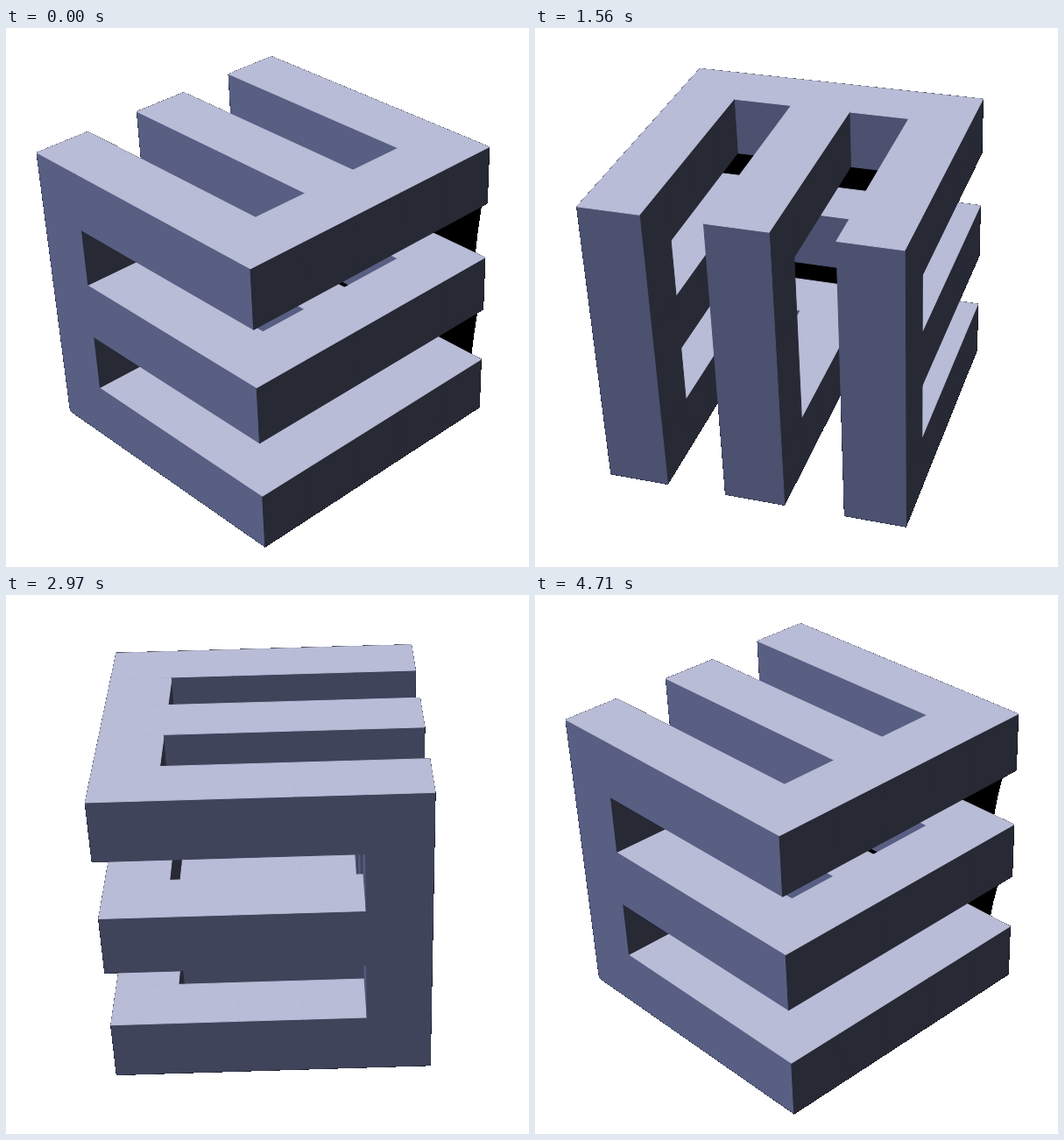
These frames come from a looping animation (597x615 px, 4740 ms). An HTML page with a canvas:

```html
<!DOCTYPE html>
<html lang="en">
<head>
<meta charset="utf-8">
<title>Turning letter cube</title>
<style>
html, body { margin: 0; width: 100%; height: 100%; overflow: hidden; background: #fff; }
canvas { display: block; }
</style>
</head>
<body>
<canvas id="stage" width="597" height="615"></canvas>
<script>
const W = 597, H = 615, STEP = 30, STEPS = 158;
const ctx = document.getElementById('stage').getContext('2d', { willReadFrequently: true });
const RAD = Math.PI / 180, START = 46.15, LIGHT = 212 * RAD;
const EYE = { x: 0.773, y: -8.86, z: 4.57 };
const TOP = 'rgb(184,188,214)';
let cos = 1, sin = 0;

// The cube spans -1..1 in x and y, and -2..0 in z, split into 5 x 5 x 5 cells.
const X = i => -1 + 0.4 * i;
const Z = k => -2 + 0.4 * k;
const inside = n => n >= 0 && n < 5;
const even = n => n % 2 === 0;
const hollow = (i, j, k) => i === 2 && k === 2 && j > 0 && j < 4;
const solid = (i, j, k) => inside(i) && inside(j) && inside(k) &&
  (j === 0 || even(i)) && (j === 4 || even(k)) && !hollow(i, j, k);

function project(x, y, z) {
  const rx = x * cos - y * sin, ry = x * sin + y * cos;
  const w = 1 - 0.004 * rx + 0.0853 * ry - 0.0535 * z;
  return [434 + (183 * rx - 141.5) / w, 290 - (151 + 97.3 * ry + 155.7 * z) / w];
}

function shade(azimuth) {
  const c = Math.max(0, Math.cos(azimuth - LIGHT));
  return `rgb(${39 + 50.7 * c | 0},${41 + 56 * c | 0},${52 + 82 * c | 0})`;
}

function quad(color, corners) {
  ctx.fillStyle = ctx.strokeStyle = color;
  ctx.beginPath();
  for (const c of corners) ctx.lineTo(...project(...c));
  ctx.closePath();
  ctx.fill();
  ctx.stroke();
}

// Cell indices from the farthest to the nearest along one axis
const farFirst = (eye, pos) => [0, 1, 2, 3, 4].sort((a, b) =>
  Math.abs(pos(b + 0.5) - eye) - Math.abs(pos(a + 0.5) - eye));

function drawCube(angle) {
  const ex = EYE.x * cos + EYE.y * sin, ey = EYE.y * cos - EYE.x * sin;
  const xs = farFirst(ex, X), ys = farFirst(ey, X), zs = farFirst(EYE.z, Z);
  const sideX = [shade(angle + Math.PI), shade(angle)];
  const sideY = [shade(angle - Math.PI / 2), shade(angle + Math.PI / 2)];
  ctx.lineWidth = 1;
  ctx.lineJoin = 'round';
  for (const k of zs) for (const j of ys) for (const i of xs) {
    if (!solid(i, j, k)) continue;
    const x0 = X(i), x1 = X(i + 1), y0 = X(j), y1 = X(j + 1), z0 = Z(k), z1 = Z(k + 1);
    for (const s of [0, 1]) {
      const d = 2 * s - 1, x = s ? x1 : x0, y = s ? y1 : y0;
      if ((ex - x) * d > 0 && !solid(i + d, j, k))
        quad(sideX[s], [[x, y0, z0], [x, y1, z0], [x, y1, z1], [x, y0, z1]]);
      if ((ey - y) * d > 0 && !solid(i, j + d, k))
        quad(sideY[s], [[x0, y, z0], [x1, y, z0], [x1, y, z1], [x0, y, z1]]);
    }
    if (!solid(i, j, k + 1))
      quad(TOP, [[x0, y0, z1], [x1, y0, z1], [x1, y1, z1], [x0, y1, z1]]);
  }
}

// Dark limit inside the notches that open to the right
function drawNotches(t) {
  const side = project(1, -1, 0)[0] > project(-1, -1, 0)[0] ? 1 : -1;
  if (project(side, -1, 0)[0] < project(side, 1, 0)[0]) return;
  const d = t < 2000 ? 7 + 13 * t / 1080 : 14;
  ctx.strokeStyle = '#000';
  ctx.lineWidth = 2;
  for (const k of [1, 3]) {
    const [ax, ay] = project(side, -1, Z(k + 1)), [bx, by] = project(side, -1, Z(k));
    ctx.beginPath();
    ctx.moveTo(ax - d, ay);
    ctx.quadraticCurveTo(ax - 1.7 * d, (ay + by) / 2, bx - 1.8 * d, by);
    ctx.stroke();
  }
}

// White reaches only what is open to the outside; enclosed gaps turn black.
function fillBackground() {
  const img = ctx.getImageData(0, 0, W, H);
  const px = new Uint32Array(img.data.buffer);
  const stack = [0];
  const visit = p => {
    if (p >= 0 && p < px.length && px[p] >>> 24 < 90) {
      px[p] = 0xffffffff;
      stack.push(p);
    }
  };
  while (stack.length) {
    const p = stack.pop();
    visit(p - 1);
    visit(p + 1);
    visit(p - W);
    visit(p + W);
  }
  ctx.putImageData(img, 0, 0);
  ctx.globalCompositeOperation = 'destination-over';
  ctx.fillStyle = '#000';
  ctx.fillRect(0, 0, W, H);
  ctx.globalCompositeOperation = 'source-over';
}

function draw(step) {
  const angle = (START + 360 * step / (STEPS - 1)) * RAD;
  cos = Math.cos(angle);
  sin = Math.sin(angle);
  ctx.clearRect(0, 0, W, H);
  drawNotches(step * STEP);
  drawCube(angle);
  fillBackground();
}

let last = -1, origin = null;
function tick(now) {
  if (origin === null) origin = now;
  const step = Math.floor(Math.max(0, now - origin) / STEP) % STEPS;
  if (step !== last) draw(last = step);
  requestAnimationFrame(tick);
}
draw(0);
requestAnimationFrame(tick);
</script>
</body>
</html>
```
